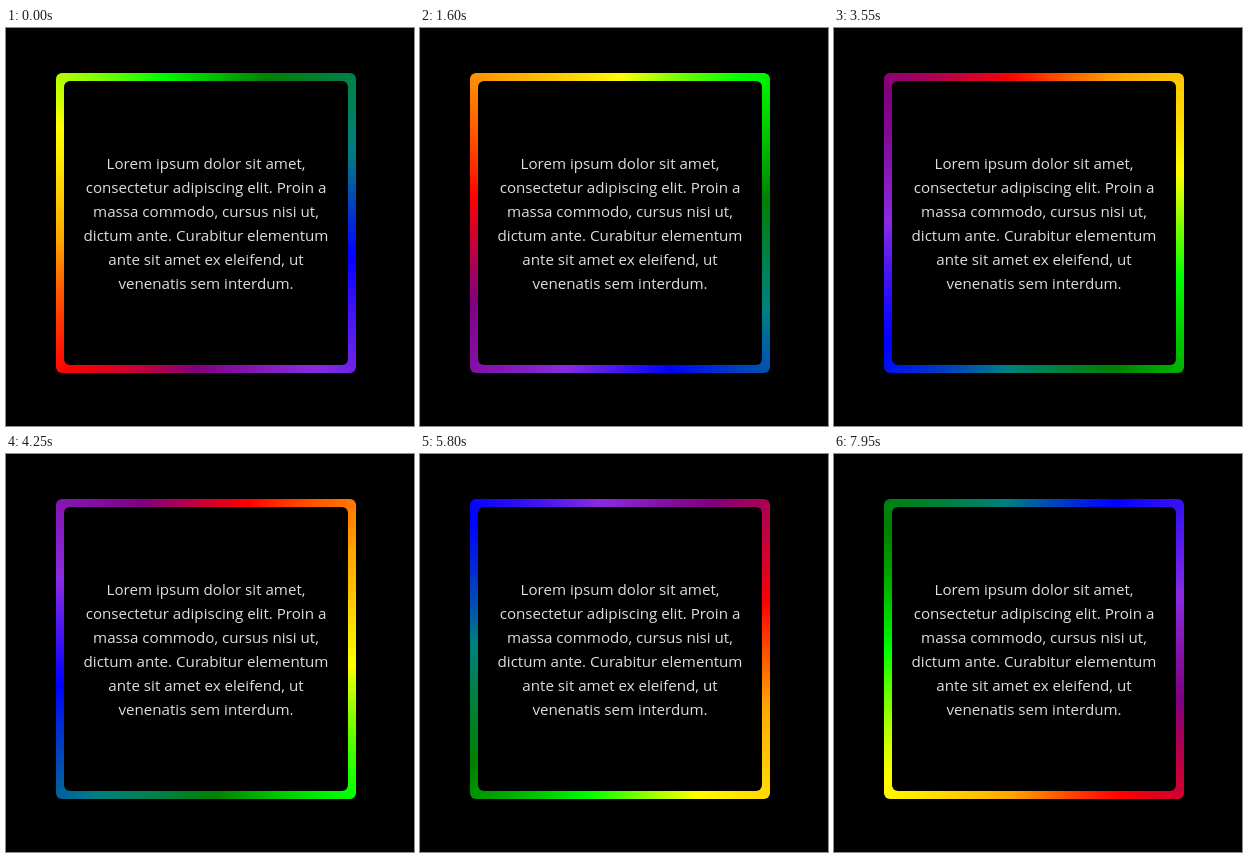
These frames come from a looping animation (408 by 398 pixels, 8000 ms). An HTML page:

```html
<!DOCTYPE html>
<html lang="la">
<head>
<meta charset="utf-8">
<title>Rainbow border</title>
<style>
  html, body {
    margin: 0;
    width: 100%;
    height: 100%;
    overflow: hidden;
    background: #000;
  }
  .frame {
    position: absolute;
    left: 50px;
    top: 45px;
    width: 300px;
    height: 300px;
    border-radius: 6px;
    background: conic-gradient(from var(--angle, 223deg),
      red, orange, yellow, lime, green, teal, blue, blueviolet, purple, red);
  }
  .card {
    position: absolute;
    inset: 8px;
    display: flex;
    align-items: center;
    justify-content: center;
    border-radius: 6px;
    background: #000;
    color: #dedede;
    font: 15.15px/24px "Open Sans", "Noto Sans", sans-serif;
    text-align: center;
    white-space: nowrap;
  }
</style>
</head>
<body>
<div class="frame">
  <div class="card"><div>
    Lorem ipsum dolor sit amet,<br>
    consectetur adipiscing elit. Proin a<br>
    massa commodo, cursus nisi ut,<br>
    dictum ante. Curabitur elementum<br>
    ante sit amet ex eleifend, ut<br>
    venenatis sem interdum.
  </div></div>
</div>
<script>
  const LOOP = 8000, STEP = 50;         // ms
  const START = 223, SPEED = 360 / 10000; // degrees, degrees per ms
  const frame = document.querySelector('.frame');

  function draw() {
    const time = Math.floor(performance.now() % LOOP / STEP) * STEP;
    frame.style.setProperty('--angle', `${START + time * SPEED}deg`);
    requestAnimationFrame(draw);
  }
  draw();
</script>
</body>
</html>
```
